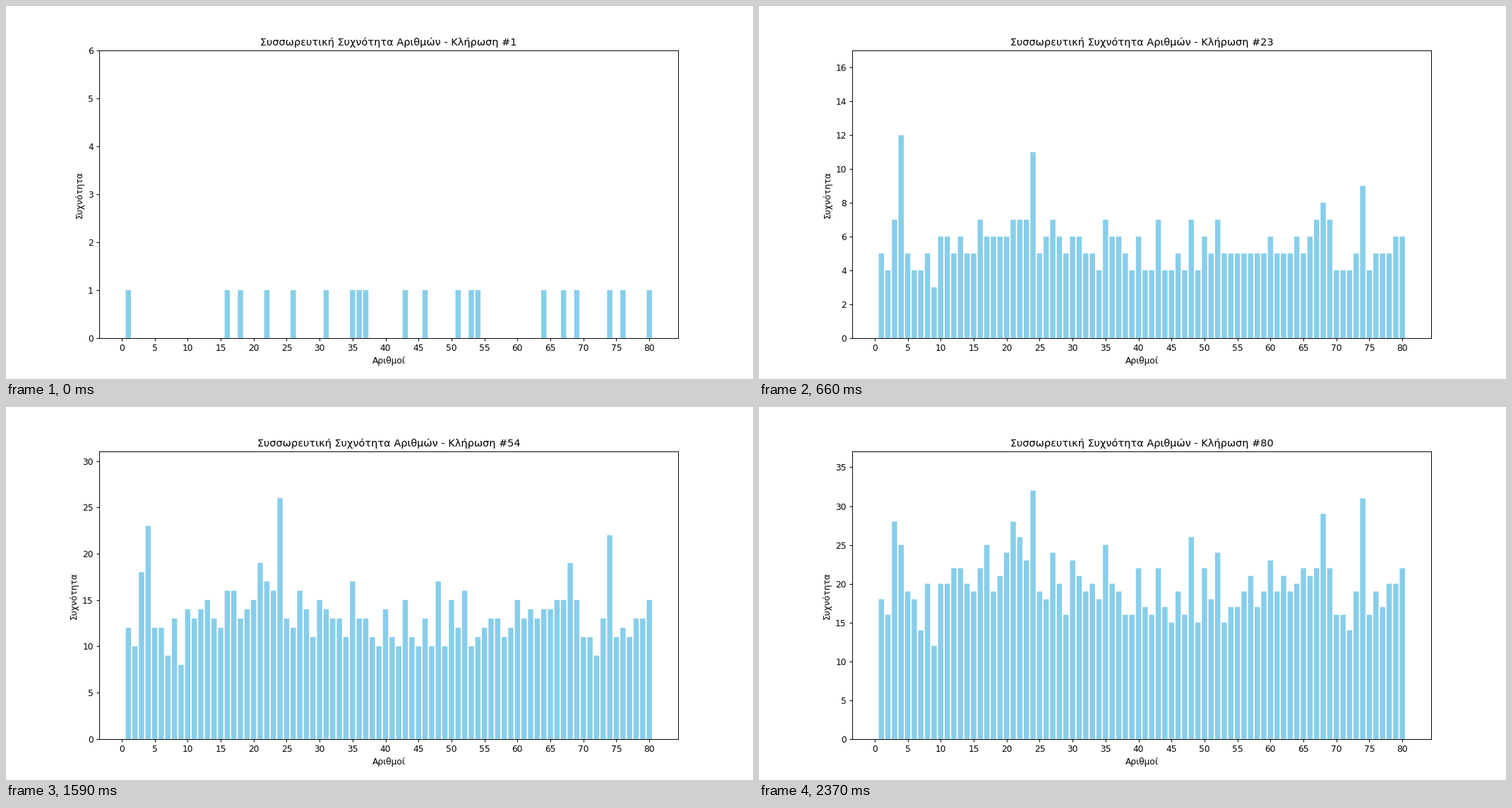
Write a matplotlib script that moves like this. It is 1058 by 529 pixels and loops after 2.4 s.

```python
import matplotlib.pyplot as plt
import numpy as np
from matplotlib.animation import FuncAnimation

NUMBERS, DRAWS, INTERVAL = 80, 80, 30
HEADROOM = 5

OPENING = {1, 16, 18, 22, 26, 31, 35, 36, 37, 43,
           46, 51, 53, 54, 64, 67, 69, 74, 76, 80}

# The numbers that take turns in the lead: their counts after the key draws.
KEY_DRAWS = (1, 13, 23, 36, 54, 70, 80)
LEADERS = {
    4: (0, 6, 12, 16, 23, 25, 25),
    24: (0, 6, 11, 16, 26, 30, 32),
    74: (1, 7, 9, 15, 22, 28, 31),
}
# Other frequent numbers and their final counts.
FREQUENT = {3: 28, 21: 28, 22: 26, 48: 26, 68: 29}

rng = np.random.default_rng(7)
draws = np.arange(1, DRAWS + 1)


def running_count(number):
    """Whole count of one number after every draw."""
    phase = rng.uniform(0.02, 0.98)
    bend = rng.uniform(0.95, 1.1)
    usual_end = np.clip(rng.normal(19.2, 3), 12, 25).round()
    if number in LEADERS:
        pace = np.interp(draws, KEY_DRAWS, LEADERS[number])
    else:
        start = number in OPENING
        end = FREQUENT.get(number, usual_end)
        pace = start + (end - start) * ((draws - 1) / (DRAWS - 1)) ** bend
    return np.floor(pace + phase)


counts = np.array([running_count(n) for n in range(1, NUMBERS + 1)]).T

fig, ax = plt.subplots(figsize=(12, 6), dpi=88.1667)
bars = ax.bar(np.arange(1, NUMBERS + 1), counts[0], color="skyblue", snap=False)
ax.set_xticks(range(0, NUMBERS + 1, 5))
ax.set_xlabel("Αριθμοί")
ax.set_ylabel("Συχνότητα")


def update(frame):
    heights = counts[frame]
    for bar, height in zip(bars, heights):
        bar.set_height(height)
    ax.set_ylim(0, heights.max() + HEADROOM)
    ax.set_title(f"Συσσωρευτική Συχνότητα Αριθμών - Κλήρωση #{frame + 1}",
                 fontsize=11.85)


animation = FuncAnimation(fig, update, frames=DRAWS, interval=INTERVAL,
                          init_func=lambda: update(0), repeat=True,
                          repeat_delay=0)
plt.show()
```
